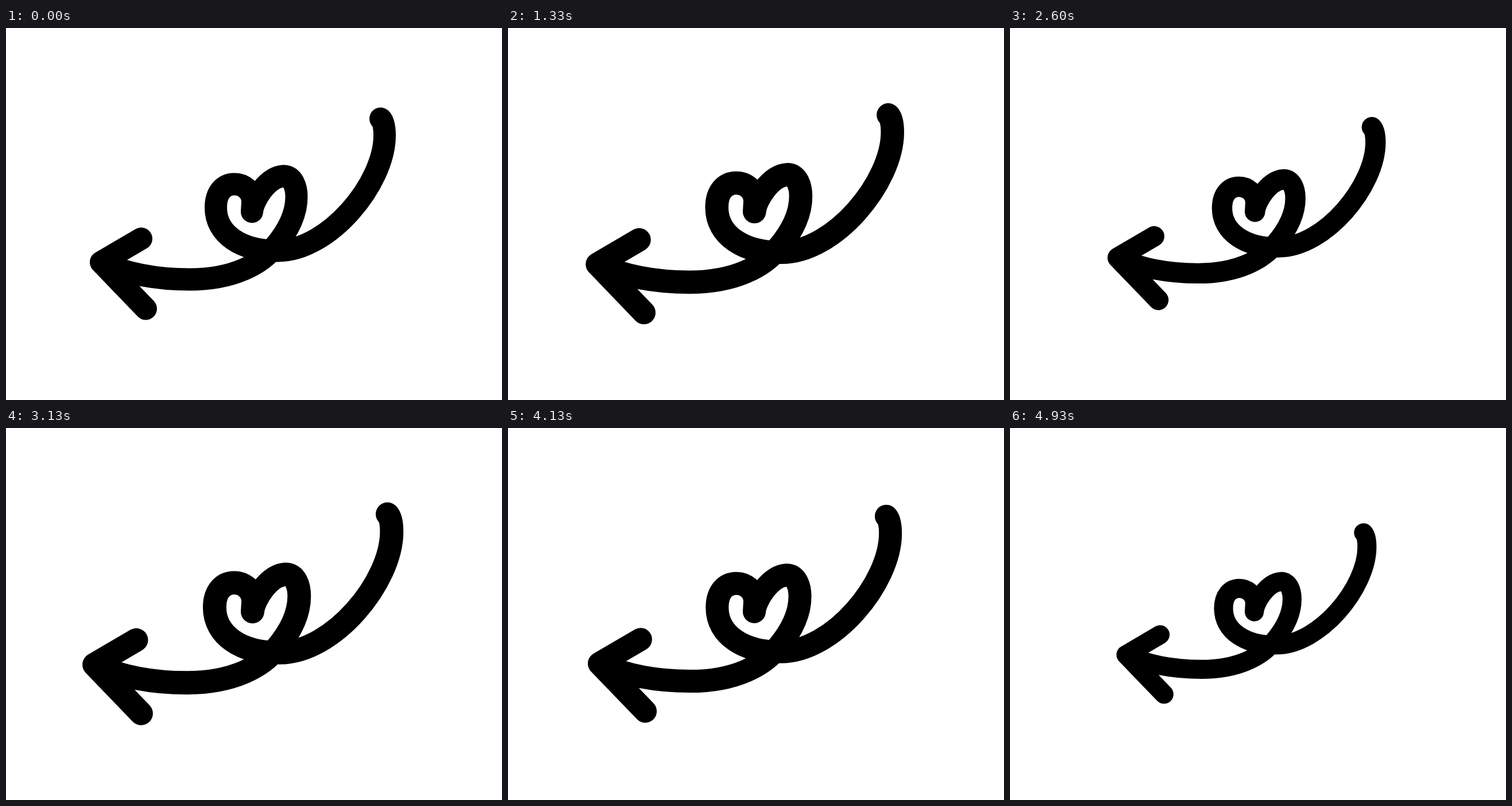
An HTML page with a canvas that plays this animation: 864 by 648 pixels, repeating every 4.99 s.

```html
<!DOCTYPE html>
<html lang="en">
<head>
<meta charset="utf-8">
<title>Beating heart arrow</title>
<style>
  html, body { margin: 0; width: 100%; height: 100%; overflow: hidden; background: #fff; }
  canvas { display: block; }
</style>
</head>
<body>
<canvas id="stage" width="864" height="648"></canvas>
<script>
const ctx = document.getElementById('stage').getContext('2d');

const LOOP = 4990;
const STEP = 200 / 3;         // 15 pictures per second
const BEAT = 15.387;          // steps per heartbeat
const PEAK = 2.55;            // step of the first peak
const RISE = BEAT / 3;
const FALL = BEAT - RISE;
const PIVOT = { x: 408.5, y: 321 };

const arrow = new Path2D(
  // tail and sweep
  'M652.5 158 C658 163 659.5 175 659.5 187 C659.5 271 562 388 474 388' +
  // left lobe
  ' C410 389.5 365.5 359 365.5 313 C365.5 287 379 272 398 272' +
  ' C413 272 429.5 283 429.5 303 L428.5 320' +
  // right lobe
  ' C430 300 455 260 483 258 C500 257 506 278 506 294 C506 318 496 348 468 381' +
  // shaft
  ' C446 410 397 438 320 438 C270 438 215 430.5 165.5 408' +
  // head
  ' M235.5 367 L165.5 408 L243.5 489'
);

// Linear swell to 1, then a quadratic ease-out back to 0.
function pulse(step) {
  const p = (step - PEAK + BEAT) % BEAT;
  return p < FALL ? (1 - p / FALL) ** 2 : (p - FALL) / RISE;
}

function draw(ms) {
  const step = Math.floor((ms % LOOP + 5) / STEP) % 75;
  const scale = (452.8 + 159.6 * pulse(step)) / 533;

  ctx.setTransform(1, 0, 0, 1, 0, 0);
  ctx.fillStyle = '#fff';
  ctx.fillRect(0, 0, 864, 648);

  ctx.translate(PIVOT.x, PIVOT.y);
  ctx.scale(scale, scale);
  ctx.translate(-PIVOT.x, -PIVOT.y);
  ctx.strokeStyle = '#000';
  ctx.lineWidth = 39;
  ctx.lineCap = ctx.lineJoin = 'round';
  ctx.stroke(arrow);
}

const start = performance.now();
function tick() {
  draw(performance.now() - start);
  requestAnimationFrame(tick);
}
tick();
</script>
</body>
</html>
```
